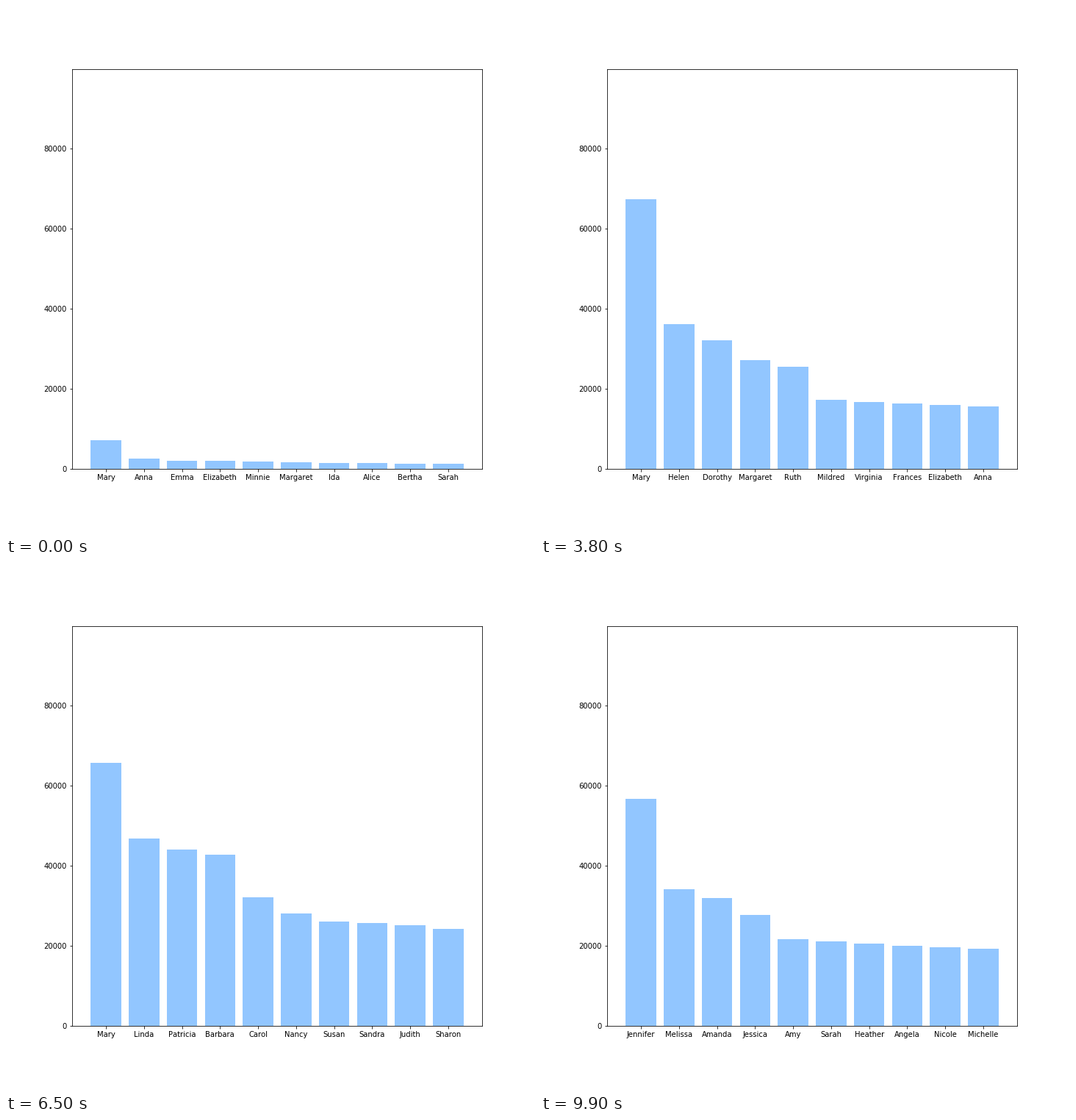
Recreate the animation shown at these times as a matplotlib script. Size 720 by 720 pixels, loop 10 s.

```python
import matplotlib.pyplot as plt
import numpy as np
from matplotlib.animation import FuncAnimation

FIRST, FRAMES, TOP = 1880, 100, 10
Y_MAX = 99689
ENTRY = 0.8  # unlisted names wait at this share of the last place

plt.rcParams.update({"font.family": "DejaVu Sans", "font.size": 10,
                     "text.kerning_factor": 6})

keys = {}


def key(year, names, *heads):
    """Rank names in a year; heads are the first places (in thousands),
    the final head is the last place, and a power law fills the gap."""
    ranks = [*range(1, len(heads)), TOP]
    fill = np.interp(np.log(np.arange(1, TOP + 1)), np.log(ranks),
                     np.log(heads))
    keys[year] = dict(zip(names.split(), 1000 * np.exp(fill)))


key(1880, "Mary Anna Emma Elizabeth Minnie Margaret Ida Alice Bertha Sarah",
    7.1, 2.6, 2, 1.95, 1.3)
key(1890, "Mary Anna Elizabeth Margaret Emma Florence Ethel Minnie Clara "
    "Bertha", 12.1, 5.2, 3.1, 2.4)
key(1905, "Mary Helen Margaret Anna Ruth Elizabeth Dorothy Mildred Marie "
    "Alice", 16.1, 6.8, 5.7, 5.5, 5.1, 4, 3.65)
key(1911, "Mary Helen Margaret Dorothy Ruth Anna Elizabeth Mildred Marie "
    "Alice", 24.4, 11.8, 9.3, 4.9)
key(1915, "Mary Helen Dorothy Margaret Ruth Anna Mildred Elizabeth Frances "
    "Virginia", 58.2, 30.9, 25.2, 23.1, 21.9, 15.8, 11.8)
key(1918, "Mary Helen Dorothy Margaret Ruth Mildred Virginia Frances "
    "Elizabeth Anna", 67.3, 36.1, 32.1, 27.1, 25.5, 17.2, 15.6)
key(1924, "Mary Dorothy Helen Betty Margaret Ruth Virginia Mildred "
    "Elizabeth Frances", 73.5, 39.9, 31.2, 28.6, 25.5, 23.9, 18.6, 15)
key(1930, "Mary Betty Dorothy Helen Margaret Barbara Patricia Joan Doris "
    "Ruth", 64.1, 38.2, 30.4, 19.9, 15.2)
key(1935, "Mary Shirley Barbara Betty Patricia Dorothy Joan Margaret Nancy "
    "Helen", 55, 42.4, 30.6, 28.6, 22.9, 19.4, 18.2, 14.7, 14.5, 12.8)
key(1940, "Mary Barbara Patricia Judith Betty Carol Nancy Shirley Linda "
    "Sandra", 56.2, 36.6, 32.7, 22.4, 16.5)
key(1946, "Mary Linda Patricia Barbara Carol Nancy Susan Sandra Sharon "
    "Judith", 67.5, 52.7, 46.3, 44, 34.6, 30, 25.6)
key(1947, "Linda Mary Patricia Barbara Sandra Nancy Sharon Susan Carol "
    "Judith", 99.7, 71.7, 51.3, 48.8, 34.8, 27)
key(1953, "Mary Linda Deborah Patricia Susan Barbara Debra Nancy Karen "
    "Pamela", 64.4, 61.3, 52.3, 51, 44.4, 38.5, 36.9, 30.6, 29.9, 25.7)
key(1956, "Mary Debra Linda Deborah Susan Patricia Karen Barbara Donna "
    "Cynthia", 61.8, 48.3, 48.1, 47.9, 46.4, 43.3, 36, 28)
key(1960, "Mary Susan Linda Karen Donna Lisa Patricia Debra Cynthia "
    "Deborah", 51.5, 39.2, 37.3, 36.4, 34.1, 33.7, 32.1, 26.7, 25.3)
key(1965, "Lisa Mary Karen Kimberly Susan Patricia Donna Linda Tammy "
    "Cynthia", 60.3, 34.3, 32.9, 28.8, 20)
key(1968, "Lisa Michelle Kimberly Jennifer Melissa Mary Angela Tammy Karen "
    "Susan", 49.5, 33.2, 31.9, 26.8, 21.7, 21.6, 19.4)
key(1972, "Jennifer Michelle Lisa Kimberly Amy Angela Melissa Heather "
    "Stephanie Tracy", 63.6, 29.4, 27, 26.1, 26, 24, 22, 15.3)
key(1979, "Jennifer Melissa Amanda Jessica Amy Sarah Heather Angela Nicole "
    "Michelle", 56.7, 34.1, 31.9, 27.7, 21.7, 19.3)

years = np.arange(FIRST, FIRST + FRAMES)
all_names = dict.fromkeys(name for top in keys.values() for name in top)
counts = {
    name: np.interp(years, list(keys),
                    [top.get(name, ENTRY * min(top.values()))
                     for top in keys.values()])
    for name in all_names}

fig, ax = plt.subplots(figsize=(10, 10), dpi=72)
fig.subplots_adjust(left=0.125, right=0.9, bottom=0.125, top=0.88)
bars = ax.bar(range(TOP), [0] * TOP, width=0.8, color="#92C6FF")
ax.set_xlim(-0.89, 9.89)
ax.set_ylim(0, Y_MAX)
ax.set_yticks(range(0, 80001, 20000))
ax.set_xticks(range(TOP))


def update(i):
    ranked = sorted(counts, key=lambda name: -counts[name][i])[:TOP]
    for bar, name in zip(bars, ranked):
        bar.set_height(counts[name][i])
    ax.set_xticklabels(ranked)
    return list(bars)


anim = FuncAnimation(fig, update, frames=FRAMES, interval=100,
                     init_func=lambda: update(0), repeat=True)
plt.show()
```
